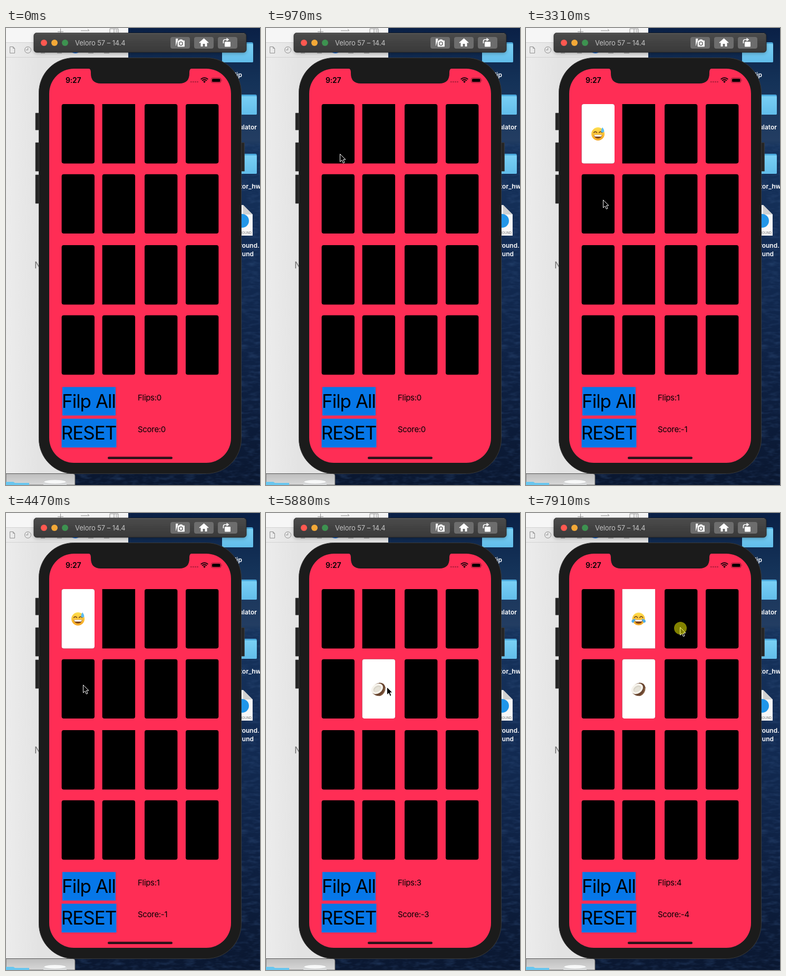
These frames come from a looping animation (482 px wide and 865 px high, 8 s). An HTML page:

```html
<!DOCTYPE html>
<html lang="en">
<head>
<meta charset="utf-8">
<title>Card matching game</title>
<style>
html, body { margin: 0; width: 100%; height: 100%; overflow: hidden; background: #0b1a36; }
svg { display: block; width: 482px; height: 865px; font-family: Inter, "Liberation Sans", sans-serif; }
.big { font-size: 35px; letter-spacing: -1px; text-anchor: middle; }
.label { font-size: 15px; letter-spacing: -.3px; }
.desk { font-size: 12px; font-weight: 600; fill: #fff; }
.end { text-anchor: end; }
.line { fill: none; stroke: #909090; }
</style>
</head>
<body>
<svg viewBox="0 0 482 865">
  <defs>
    <linearGradient id="sea" x2="0" y2="1">
      <stop offset="0" stop-color="#0a2046"/><stop offset=".12" stop-color="#143258"/>
      <stop offset=".245" stop-color="#233d62"/><stop offset=".26" stop-color="#16335c"/>
      <stop offset=".5" stop-color="#122b53"/><stop offset=".75" stop-color="#0e2143"/>
      <stop offset="1" stop-color="#0a1730"/>
    </linearGradient>
    <linearGradient id="bar" x2="0" y2="1">
      <stop offset="0" stop-color="#4b4b4b"/><stop offset="1" stop-color="#393939"/>
    </linearGradient>
    <linearGradient id="page">
      <stop offset="0" stop-color="#ececec"/><stop offset=".27" stop-color="#e3e3e3"/>
    </linearGradient>
    <linearGradient id="tray" x2="0" y2="1">
      <stop offset="0" stop-color="#bdbdbd"/><stop offset="1" stop-color="#d8d8d8"/>
    </linearGradient>
    <linearGradient id="blue" x2="0" y2="1">
      <stop offset="0" stop-color="#79d0f5"/><stop offset="1" stop-color="#62bdea"/>
    </linearGradient>
    <linearGradient id="skin" x2="0" y2="1">
      <stop offset="0" stop-color="#ffdf4f"/><stop offset="1" stop-color="#f5a623"/>
    </linearGradient>
    <filter id="waves" x="0" y="0" width="1" height="1" color-interpolation-filters="sRGB">
      <feTurbulence type="fractalNoise" baseFrequency=".05 .16" numOctaves="3" seed="4"/>
      <feColorMatrix values="0 0 0 0 .2  0 0 0 0 .32  0 0 0 0 .5  .9 0 0 0 -.4"/>
    </filter>
    <filter id="shade" x="-10%" y="-50%" width="120%" height="220%">
      <feDropShadow dx="0" dy="2" stdDeviation="3" flood-opacity=".25"/>
    </filter>

    <g id="folder">
      <path d="M0 4q0-4 3-4h16l4 4h33q3 0 3 3v33q0 2-3 2H3q-3 0-3-2z" fill="#4aa8db"/>
      <rect y="7" width="59" height="35" rx="2" fill="url(#blue)"/>
    </g>

    <g id="sweat">
      <circle r="12.5" fill="url(#skin)"/>
      <path d="M-8 1.500H8Q7 8.500 0 8.500T-8 1.500z" fill="#7a3f14"/>
      <path d="M-7.500 1.800H7.500L6.300 5H-6.300z" fill="#fff"/>
      <path d="M-8-2.500q3-3.500 6 0M2-2.500q3-3.500 6 0" fill="none" stroke="#6b3d14" stroke-width="1.400" stroke-linecap="round"/>
      <path d="M8.500-12.500q4 5.500 3 8.500-2.700 2.500-5.500 0-1-3 2.500-8.500z" fill="#5dbdf2"/>
    </g>
    <g id="joy">
      <circle r="12" fill="url(#skin)"/>
      <path d="M-7.500 1.500H7.500Q7 9 0 9T-7.500 1.500z" fill="#7a3f14"/>
      <path d="M-6.900 1.800H6.900L6 4.800H-6z" fill="#fff"/>
      <path d="M-8-2.500q3-4.500 6 0M2-2.500q3-4.500 6 0" fill="none" stroke="#6b3d14" stroke-width="1.400" stroke-linecap="round"/>
      <path d="M-6 0q-7 0-7.500 4.500 1 4 4.500 2Q-7 4-6 0zM6 0q7 0 7.500 4.500-1 4-4.500 2Q7 4 6 0z" fill="#4faeea"/>
    </g>
    <g id="berry">
      <path d="M-9-6Q-3-12 5-7 11-3 11 4 10 13 4 13-4 11-9 4-12-2-9-6z" fill="#b8282c"/>
      <path d="M-4 0h1M1-3h1M1 4h1M6 1h1M6 8h1M-2 7h1" stroke="#e59a5c" stroke-width="1.200"/>
      <path d="M-12-5l4 1-1 3 3-3 3 2v-4l4-1-4-2 1-3-4 2-4-1 1 3z" fill="#4a6b2c"/>
    </g>
    <g id="coconut">
      <path d="M-12 0Q-10-10 2-12 11-12 13-3 13 9 3 13-6 14-11 8z" fill="#6a4630"/>
      <path d="M4 12Q12 8 11-3" fill="none" stroke="#8b6448" stroke-width="1.500"/>
      <ellipse cx="-2" cy="-2" rx="12" ry="9" transform="rotate(-35)" fill="#f6f3ec"/>
      <ellipse cx="-2" cy="-2" rx="8" ry="5.200" transform="rotate(-35)" fill="#d8d3c8"/>
      <ellipse cx="-2.500" cy="-1" rx="6.500" ry="3.800" transform="rotate(-35)" fill="#e6e2d8"/>
    </g>
  </defs>

  <!-- desktop -->
  <rect width="482" height="865" fill="url(#sea)"/>
  <rect x="131" y="217" width="351" height="648" filter="url(#waves)"/>
  <use href="#folder" x="410" y="23"/>
  <use href="#folder" x="417" y="122"/>
  <use href="#folder" x="417" y="234"/>
  <path d="M412 335h38l18 18v40h-56z" fill="#f7f7f7"/>
  <path d="M450 335v18h18z" fill="#d0d0d0"/>
  <circle cx="448" cy="365" r="13" fill="#2196e8"/>
  <text x="466" y="390" class="end" font-size="6" fill="#777">GROUND</text>
  <g class="desk">
    <text x="448" y="93" class="end">Flip</text>
    <text x="476" y="192" class="end">ulator</text>
    <text x="444" y="304">tor_hw</text>
    <text x="481" y="416" class="end">round.</text>
    <text x="470" y="432" class="end">und</text>
  </g>

  <!-- window behind the phone -->
  <path d="M0 0H232V800H131V843H0z" fill="url(#page)"/>
  <rect width="232" height="27" fill="#f6f6f6"/>
  <path d="M0 27.500H232M0 55.500H232" stroke="#d2d2d2"/>
  <g class="line">
    <path d="M98 7h11M103.500 1v12M142 5h16l-3-3M205 1v11M197 1.500h16v11h-16zM208 4h3M208 7h3"/>
    <path d="M7.500 35.500h6l3 3v9h-9zM13.500 35.500v3h3"/>
    <circle cx="41.500" cy="41.500" r="6"/>
    <path d="M41.500 37.500v4h-4M66 47.500h8M97 47.500h9M156 47.500h10M186 47.500h10"/>
  </g>
  <path d="M125 46h13q-6 4-13 0z" fill="#1479ff"/>
  <text x="54" y="455" font-size="17" fill="#747474">N</text>
  <path d="M0 843.500H127q4 0 4 4V865H0z" fill="url(#tray)" stroke="#555"/>
  <path d="M0 859h14l3 2h27v4H0z" fill="#69c6ef"/>
  <path d="M71 860q0-5 22-5t22 5v5H71z" fill="#d8dadb"/>
  <ellipse cx="93" cy="859" rx="21" ry="4" fill="#f7f8f8" stroke="#bbb" stroke-width=".6"/>

  <!-- phone -->
  <path d="M56 161h8v32h-8zM56 217h8v54h-8zM56 278h8v54h-8zM445 217h7.500v54H445z" fill="#252525" stroke="#444" stroke-width=".7"/>
  <rect x="62.500" y="56.500" width="384" height="787" rx="66" fill="#1b1b1b" stroke="#393939"/>
  <rect x="82" y="77" width="345" height="746" rx="47" fill="#ff2d55"/>
  <path d="M155 76q6 1 6 7v3q0 19 19 19H329q19 0 19-19v-3q0-6 6-7z" fill="#1b1b1b"/>
  <text x="113" y="104" font-size="14" font-weight="600" letter-spacing="-.2">9:27</text>
  <path d="M350 102h15" stroke="#a51d3a" stroke-width="2" stroke-dasharray="2.500 1.600"/>
  <g fill="none" stroke="#16050a" stroke-width="2">
    <path d="M369.700 97q6.800-5.500 13.600 0M372 99.500q4.500-3.600 9 0"/>
  </g>
  <path d="M374 101.200q2.500-1.800 5 0l-2.500 2.700z" fill="#16050a"/>
  <rect x="389.500" y="94.500" width="18.500" height="9" rx="2.800" fill="none" stroke="#8c1a34"/>
  <rect x="391" y="96" width="15.500" height="6" rx="1.500"/>
  <path d="M409.500 97.500q1.500 1.500 0 3z" fill="#8c1a34"/>
  <g id="cards"></g>
  <path d="M107 679.500h101v54H107zM105.500 739.500h104v54.500H105.500z" fill="#0677e8"/>
  <g class="big">
    <text x="157" y="719">Filp All</text>
    <text x="157" y="779">RESET</text>
  </g>
  <text id="flips" class="label" x="250" y="705"></text>
  <text id="score" class="label" x="250" y="765"></text>
  <rect x="193" y="811.500" width="123" height="4.500" rx="2.200" fill="#2a1219"/>

  <!-- title bar -->
  <rect x="53" y="9.500" width="403" height="36.500" rx="5" fill="url(#bar)" stroke="#252525" filter="url(#shade)"/>
  <path d="M57 10.500H452" stroke="#666"/>
  <circle cx="72" cy="28" r="6" fill="#fe5850"/>
  <circle cx="92" cy="28" r="6" fill="#f2a837"/>
  <circle cx="112" cy="28" r="6" fill="#3d9250"/>
  <text x="131" y="33" font-size="13" letter-spacing="-.1" fill="#c3c3c3">Veloro 57 – 14.4</text>
  <path d="M316 17h29q4 0 4 4v14q0 4-4 4h-29q-4 0-4-4V21q0-4 4-4zm45 0h29q4 0 4 4v14q0 4-4 4h-29q-4 0-4-4V21q0-4 4-4zm45 0h29q4 0 4 4v14q0 4-4 4h-29q-4 0-4-4V21q0-4 4-4z" fill="#6d6d6d"/>
  <path d="M322.500 33.500v-13h4M326 24h2.500l1.500-2h4l1.500 2h3v11H326z" fill="#fff" stroke="#fff" stroke-width=".8"/>
  <circle cx="332" cy="29.500" r="3.200" fill="#fff" stroke="#6d6d6d" stroke-width="1.500"/>
  <path d="M375.500 19.500l9 8-1.200 1.300-1.800-1.500V35h-4v-5h-4v5h-4v-7.700l-1.800 1.500-1.200-1.300z" fill="#fff"/>
  <rect x="415" y="26" width="11" height="9.500" rx="1" fill="#fff"/>
  <path d="M412.500 29v-4q0-3 3-3h4" fill="none" stroke="#fff" stroke-width="1.700"/>
  <path d="M418.500 18.500l5 3.500-5 3.500z" fill="#fff"/>

  <path id="cursor" d="M.5.500V15.200L4 12 6.400 17.600 9 16.500 6.600 11H11z" stroke="#fff" stroke-linejoin="round"/>
  <circle id="click" r="12" fill="#ff0" fill-opacity=".51"/>
</svg>
<script>
const $ = id => document.getElementById(id);
const LOOP = 8000;
const cols = [105.6, 182.7, 263, 341], rows = [144, 276.7, 411, 543.8];

// Face, column, row, time turned up, time turned down
const faces = [
  ['sweat', 0, 0, 3310, 5880],
  ['berry', 0, 1, 4620, 5880],
  ['coconut', 1, 1, 5880, LOOP],
  ['joy', 1, 0, 7290, LOOP],
];
// Start, steps, step length, end x, end y
const moves = [
  [140, 9, 83, 140, 238],
  [2780, 5, 74, 146, 325],
  [4770, 4, 80, 229, 329],
  [6180, 5, 82, 220, 218],
  [7680, 4, 76.500, 292, 216],
];
const clicks = [[890, 970], [1980, 2140], [3150, 3310], [5170, 5260], [6508, 6590], [7908, LOOP]];

const box = (c, r, fill) => {
  const square = c === 1 && r % 2 === 0;
  return `<rect x="${cols[c]}" y="${rows[r]}" width="62.400" height="112.400" rx="${square ? 0 : 4}" fill="${fill}"/>`;
};
const backs = rows.map((_, r) => cols.map((_, c) => box(c, r, '#000')).join('')).join('');
$('cards').innerHTML = backs + faces.map(([name, c, r]) =>
  `<g id="face-${name}">${box(c, r, '#fff')}<use href="#${name}" x="${cols[c] + 31}" y="${rows[r] + 56.500}"/></g>`).join('');

const show = (el, on) => el.style.display = on ? '' : 'none';

function pointer(t) {
  let x = 388, y = 738;
  for (const [start, steps, gap, endX, endY] of moves) {
    if (t < start) break;
    const p = Math.min(1, (Math.floor((t - start) / gap) + 1) / steps);
    const e = p * p * (3 - 2 * p);
    x += (endX - x) * e;
    y += (endY - y) * e;
  }
  return `translate(${x} ${y})`;
}

function draw(now) {
  const t = now % LOOP;
  let flips = 0;
  for (const [name, , , up, down] of faces) {
    if (t >= up) flips++;
    show($('face-' + name), t >= up && t < down);
  }
  $('flips').textContent = 'Flips:' + flips;
  $('score').textContent = 'Score:' + -flips;

  const at = pointer(t);
  $('cursor').setAttribute('transform', at);
  $('click').setAttribute('transform', at + ' translate(1 2)');
  show($('cursor'), t >= 140);
  show($('click'), clicks.some(([on, off]) => t >= on && t < off));
}

const begin = performance.now();
function frame() {
  draw(performance.now() - begin);
  requestAnimationFrame(frame);
}
frame();
</script>
</body>
</html>
```
